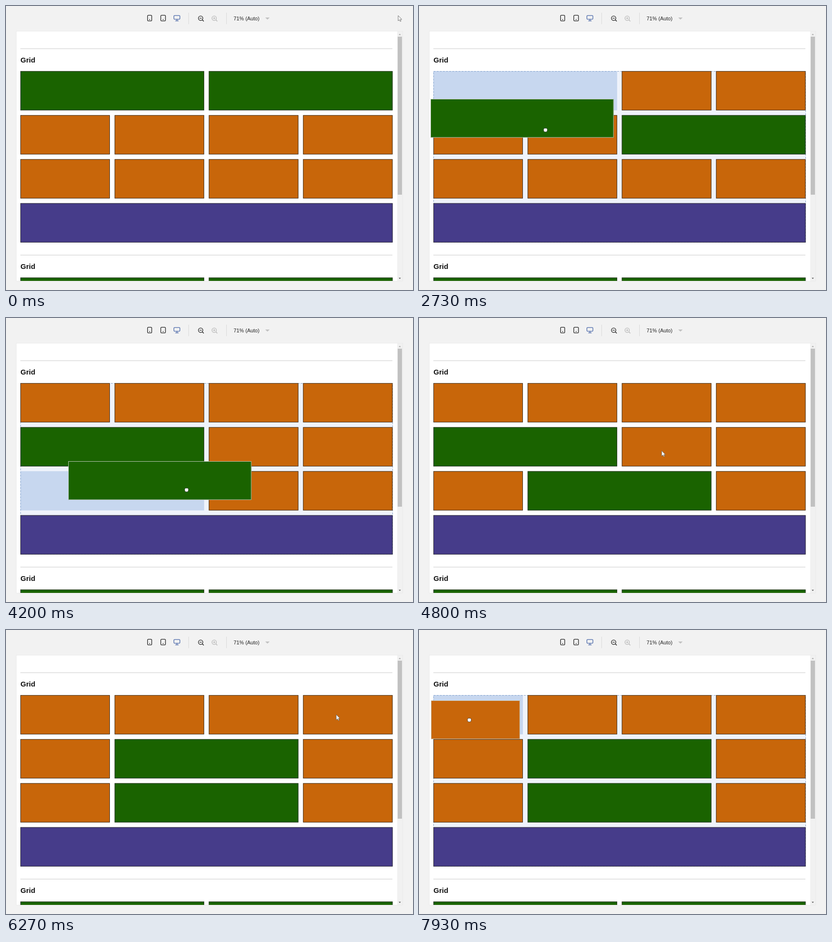
These frames come from a looping animation (850x593 px, 8 s). An HTML page with a canvas:

```html
<!DOCTYPE html>
<html lang="en">
<head>
<meta charset="utf-8">
<title>Grid drag and drop</title>
<style>
html, body { margin: 0; width: 100%; height: 100%; overflow: hidden; background: #f2f2f2; }
canvas { display: block; }
</style>
</head>
<body>
<canvas id="stage" width="850" height="593"></canvas>
<script>
const ctx = document.getElementById('stage').getContext('2d');
const LOOP = 8000, SHIFT = 250, PAUSE = 100;
const LEFT = 30, TOP = 135.9, COL = 196.8, ROW = 91.95, GAP = 9.8, HEIGHT = 82, WIDE = 777.5;
const GREEN = '#1a6300', ORANGE = '#c8660a', PURPLE = '#463c8a', EDGE = '#2e2e2a';

// grip: pointer inside the block; via: block position on the way; moves: time and new index.
const drags = [
  { item: 'A', from: 950, to: 1950, grip: [199, 53], via: [[1330, 29, 201]], moves: [[1291, 2], [1600, 5]] },
  { item: 'B', from: 2450, to: 3200, grip: [240, 65], via: [[2730, 24, 194]], moves: [[2790, 4]] },
  { item: 'A', from: 3650, to: 4600, grip: [247, 60], via: [[4200, 130, 299]], moves: [[3900, 7], [4330, 8]] },
  { item: 'e', from: 4950, to: 5800, grip: [87, 38], via: [[5470, 443, 131]], moves: [[5282, 2]] },
  { item: 'c', from: 6450, to: LOOP + 300, grip: [80, 41], via: [[7000, 279, 145], [7930, 25, 147]],
    moves: [[6812, 2], [7080, 1], [7400, 0]] }
];

const mix = (a, b, k) => a + (b - a) * k;
const isWide = id => id < 'a';
const colorOf = id => isWide(id) ? GREEN : ORANGE;
const spanWidth = span => span * COL - GAP;

// Capital letters take two columns; a cell that does not fit starts a new row.
function layout(order) {
  const cells = {};
  let col = 0, row = 0;
  for (const id of order) {
    const span = isWide(id) ? 2 : 1;
    if (col + span > 4) { col = 0; row++; }
    cells[id] = { x: LEFT + col * COL, y: TOP + row * ROW, w: spanWidth(span) };
    col += span;
  }
  return { order, cells, rows: row + 1 };
}

const steps = [{ start: 0, movers: '', ...layout('ABabcdefgh') }];
const path = [{ t: 150, x: 819, y: 20 }];

for (const { item, from, to, grip, via, moves } of drags) {
  const stop = (t, x, y) => path.push({ t, x: x + grip[0], y: y + grip[1] });
  const home = steps.at(-1).cells[item];
  stop(from - PAUSE, home.x, home.y);
  stop(from, home.x, home.y);
  via.forEach(point => stop(...point));
  for (const [start, index] of moves) {
    const { order } = steps.at(-1), old = order.indexOf(item);
    const rest = order.replace(item, '');
    const movers = order.slice(Math.min(old, index), Math.max(old, index) + 1);
    steps.push({ start, movers, ...layout(rest.slice(0, index) + item + rest.slice(index)) });
  }
  const drop = steps.at(-1).cells[item];
  stop(to, drop.x, drop.y);
}

function pointer(t) {
  const i = path.findIndex(p => p.t > t);
  const b = path[i], a = path[i - 1] || b;
  const u = a === b ? 0 : (t - a.t) / (b.t - a.t), k = u * u * (3 - 2 * u);
  return { x: mix(a.x, b.x, k), y: mix(a.y, b.y, k) };
}

function gridState(t) {
  const i = steps.findLastIndex(s => s.start <= t);
  const { start, movers, order, rows, cells: goal } = steps[i];
  const k = 1 - (1 - Math.min(1, (t - start) / SHIFT)) ** 3;
  const cells = { ...goal };
  for (const id of movers) {
    const a = steps[i - 1].cells[id], b = goal[id];
    cells[id] = { x: mix(a.x, b.x, k), y: mix(a.y, b.y, k), w: b.w };
  }
  return { cells, rows, order };
}

function fill(color, x, y, w, h) {
  ctx.fillStyle = color;
  ctx.fillRect(x, y, w, h);
}

function block(x, y, w, h, color, edge = EDGE) {
  fill(color, x, y, w, h);
  ctx.strokeStyle = edge;
  ctx.lineWidth = .9;
  ctx.strokeRect(x + .5, y + .5, w - 1, h - 1);
}

function trace(points, close) {
  ctx.beginPath();
  points.forEach(([x, y]) => ctx.lineTo(x, y));
  if (close) ctx.closePath();
}

function line(color, width, ...points) {
  trace(points);
  ctx.strokeStyle = color;
  ctx.lineWidth = width;
  ctx.stroke();
}

function triangle(color, x, y, w, h) {
  trace([[x - w, y], [x + w, y], [x, y + h]], true);
  ctx.fillStyle = color;
  ctx.fill();
}

function text(string, x, y, font, color) {
  ctx.font = font + ' "Liberation Sans", Arial, sans-serif';
  ctx.fillStyle = color;
  ctx.fillText(string, x, y);
}

function frameIcon(color, x, y, w, h) {
  ctx.beginPath();
  ctx.roundRect(x, y, w, h, 1.6);
  ctx.strokeStyle = color;
  ctx.lineWidth = 1.3;
  ctx.stroke();
}

function zoomIcon(color, x, plus) {
  ctx.beginPath();
  ctx.arc(x, 25.5, 4.6, 0, Math.PI * 2);
  ctx.strokeStyle = color;
  ctx.lineWidth = 1.3;
  ctx.stroke();
  line(color, 1.5, [x + 3.3, 28.8], [x + 6.5, 32]);
  line(color, 1.2, [x - 2.3, 25.5], [x + 2.3, 25.5]);
  if (plus) line(color, 1.2, [x, 23.2], [x, 27.8]);
}

function toolbar() {
  for (const [x, w] of [[295.6, 8.8], [323.3, 9.8]]) {
    frameIcon('#222', x, 19.3, w, 11.8);
    fill('#222', x + w / 2 - 1, 27.6, 2, 1.3);
  }
  frameIcon('#4765a8', 350.6, 19.8, 12.6, 7.8);
  line('#4765a8', 1.3, [357, 28], [357, 31]);
  line('#4765a8', 1.3, [353.5, 31], [360.5, 31]);
  for (const x of [381.5, 460.5]) line('#d9d9d9', 1, [x, 14], [x, 38]);
  zoomIcon('#222', 406.5, false);
  zoomIcon('#b9b9b9', 434.8, true);
  text('71% (Auto)', 475.3, 30, '10.8px', '#222');
  triangle('#c2c2c2', 546, 24, 4.7, 4.5);
}

function section(y) {
  fill('#d6d6d6', 30, y + 88.5, 777, 1.3);
  text('Grid', 30.3, y + 118, 'bold 15px', '#111');
}

function dropArea(rows) {
  const h = (rows + 1) * ROW - GAP;
  fill('#eff3fb', LEFT, TOP, WIDE, h);
  ctx.setLineDash([4, 2.5]);
  ctx.strokeStyle = '#8ba6cb';
  ctx.lineWidth = 1;
  ctx.strokeRect(30.5, 136.5, 777, h - 1);
  ctx.setLineDash([]);
}

function scrollbar(rows) {
  fill('#f1f1f1', 817, 53, 11, 521);
  fill('#c1c1c1', 818, 64, 9, rows > 3 ? 295 : 330);
  triangle('#a3a3a3', 822.4, 60.5, 2.3, -2.6);
  triangle('#505050', 822.4, 567.5, 2.3, 2.6);
}

function arrow({ x, y }) {
  trace([[0, 0], [0, 11], [2.6, 8.7], [4.3, 12.3], [6, 11.5], [4.4, 8], [7.6, 8]]
    .map(([dx, dy]) => [x + dx, y + dy]), true);
  ctx.fillStyle = '#fff';
  ctx.fill();
  ctx.strokeStyle = '#666';
  ctx.lineWidth = .9;
  ctx.stroke();
}

function fist({ x, y }) {
  ctx.beginPath();
  ctx.roundRect(x - 3.8, y - 3.8, 7.8, 7.8, [2.5, 2.5, 3.6, 3.6]);
  ctx.fillStyle = '#fff';
  ctx.fill();
  ctx.strokeStyle = '#222';
  ctx.lineWidth = .7;
  ctx.stroke();
}

function draw(t) {
  const { cells, rows, order } = gridState(t);
  const drag = drags.find(d => t >= d.from && t < d.to);
  const cursor = pointer(t);

  fill('#f2f2f2', 0, 0, 850, 593);
  toolbar();
  block(21, 52, 808, 523, '#fff', '#e9e9e9');

  ctx.save();
  ctx.beginPath();
  ctx.rect(22, 53, 806, 521);
  ctx.clip();
  section(0);
  if (drag) dropArea(rows);
  block(LEFT, TOP + rows * ROW, WIDE, HEIGHT, PURPLE);
  for (const id of order) {
    const { x, y, w } = cells[id];
    if (drag && id === drag.item) fill('rgba(106,150,208,.3)', x, y, w, HEIGHT);
    else block(x, y, w, HEIGHT, colorOf(id));
  }
  const next = 431 + (rows - 3) * ROW;
  section(next);
  for (const col of [0, 2]) block(LEFT + col * COL, TOP + next, spanWidth(2), HEIGHT, GREEN);
  scrollbar(rows);
  ctx.restore();

  if (drag) {
    const { item, grip } = drag;
    block(cursor.x - grip[0], cursor.y - grip[1], cells[item].w - 1.2, HEIGHT - 1.2, colorOf(item), '#c9cfc6');
    fist(cursor);
  } else arrow(cursor);
}

function tick() {
  draw(performance.now() % LOOP);
  requestAnimationFrame(tick);
}
tick();
</script>
</body>
</html>
```
